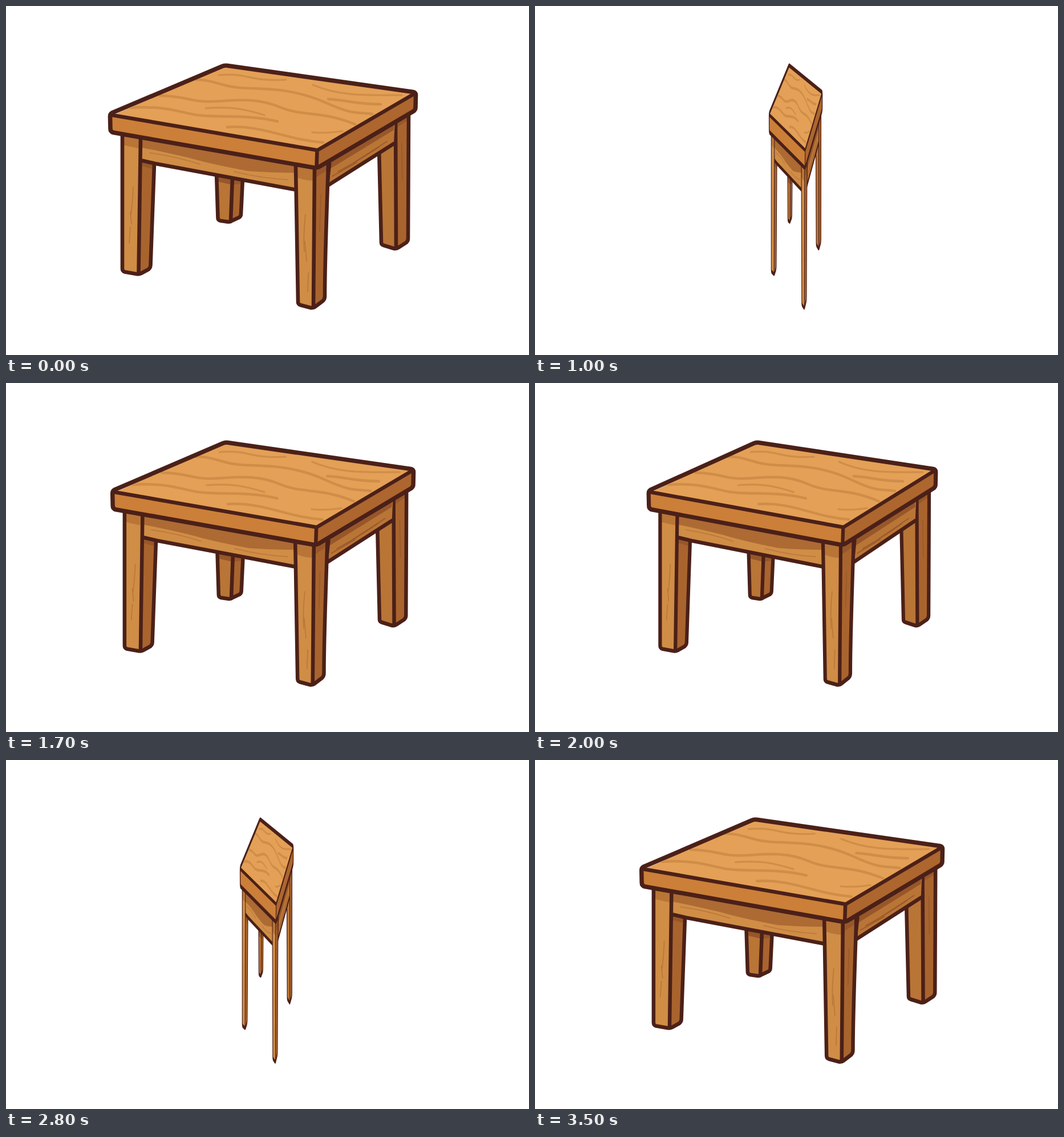
These frames come from a looping animation (917x611 px, 3600 ms). An HTML page:

```html
<!DOCTYPE html>
<html lang="en">
<head>
<meta charset="utf-8">
<title>Turning table</title>
<style>
  @property --turn { syntax: "<angle>"; inherits: false; initial-value: 0deg; }
  html, body { margin: 0; width: 100%; height: 100%; overflow: hidden; background: #fff; }
  svg { display: block; width: 100%; height: 100%; }

  /* Half turns in 10 degree steps; the table narrows with the cosine and never mirrors. */
  #table {
    transform-origin: 458.5px 0;
    transform: scaleX(max(1 / 917, cos(var(--turn))));
    animation: turn 1800ms steps(18) -900ms infinite;
  }
  @keyframes turn {
    from { --turn: -90deg; }
    to { --turn: 90deg; }
  }

  .line { fill: none; stroke: #4b2018; stroke-width: 6.6; stroke-linejoin: round; stroke-linecap: round; }
  .rim { stroke-width: 7.6; }
  .top { fill: #e3a056; }
  .edge { fill: #cb7f38; }
  .edge-side { fill: #ad662e; }
  .front { fill: #cf8d46; }
  .side { fill: #a9642e; }
  .dim { fill: #b97536; }
  .shade { fill: #ad6a33; }
  .deep { fill: #985729; }
  .grain { fill: none; stroke: #cf8d48; stroke-width: 4.5; stroke-linecap: round; }
  .thin { stroke-width: 3.2; }
  .fine { fill: none; stroke: #b97639; stroke-width: 1.6; stroke-linecap: round; }
  .dark { fill: none; stroke: #9a592a; stroke-width: 1.6; stroke-linecap: round; }
</style>
</head>
<body>
<svg viewBox="0 0 917 611">
  <defs>
    <clipPath id="face"><path d="M188 192 385 104 718 153 546 253Z"/></clipPath>
  </defs>
  <g id="table">

    <!-- back leg -->
    <path class="dim" d="M369 290 372 375 393 378 397 295Z"/>
    <path class="side" d="M397 295 393 378 412 367 415 300Z"/>
    <path class="deep" d="M369 290 370 307 396 313 414 311 415 300Z"/>
    <path class="line" d="M369 292 371.500 371Q371.500 375 376 376L390 378Q393 378 396 376L409 370Q412 368 412 364L415 302M397 300 394 377"/>

    <!-- right leg -->
    <path class="dim" d="M654 220 658 418 684 425 682 200Z"/>
    <path class="side" d="M682 200 684 425 705 410 706 188Z"/>
    <path class="deep" d="M682 198 706 186V199L683 214Z"/>
    <path class="line" d="M654 248 658 414Q658 418 662 419L680 424.500Q684 425.500 688 423L702 414Q705 411 705 407L706 188M683 204 684 424"/>
    <path class="dark" d="M694 240 695 305"/>

    <!-- side apron -->
    <path class="dim" d="M563 268 682 200 680 241 563 315Z"/>
    <path class="deep" d="M565 272 680 205V217L565 287Z"/>
    <path class="dark" d="M582 290Q620 270 655 246M572 298 615 274M610 274 668 237"/>
    <path class="line" d="M567 276 563 315 680 241"/>

    <!-- front left leg -->
    <path class="front" d="M204 222 204 464 233 469 236 228Z"/>
    <path class="side" d="M237 260 233 469 254 457 260 270Z"/>
    <path class="dim" d="M204 222 236 228V250L204 243Z"/>
    <path class="deep" d="M238 270 260 275V286L237 280Z"/>
    <path class="fine" d="M223 317Q222 345 219 366M218 360 220 382M218 387 216 415"/>
    <path class="line" d="M204 226 204 460Q204 464 208 465.500L228 469Q233 470 237 468L250 461Q253.500 458 253.500 454L260 276"/>

    <!-- front apron -->
    <path class="front" d="M237 230 508 280 508 321 238 269Z"/>
    <path class="shade" d="M237 234 508 280V292Q465 292 425 289 360 277 322 266 280 256 238 248Z"/>
    <path class="fine" d="M252 257Q300 264 340 277M400 290Q450 302 494 304"/>
    <path class="line" d="M238 270.500 262 276 507 321.500M236 232 232.500 467"/>

    <!-- front leg -->
    <path class="front" d="M508 280 512 522 538 528 541 284Z"/>
    <path class="side" d="M541 284 538 528 559 511 566 276Z"/>
    <path class="dim" d="M508 280 541 286V306Q522 306 508 299Z"/>
    <path class="deep" d="M543 287 565 276V286L542 301Z"/>
    <path class="fine" d="M525 365Q521 400 523 430M524 412 527 447M530 467 529 500"/>
    <path class="dark" d="M552 330 550 395"/>
    <path class="line" d="M508 282 512 518Q512 522 516 523.500L533 528Q538 529.500 542 526.500L556 516Q559 513 559 508C559 440 563 350 565 276M541 286 539 526"/>

    <!-- top -->
    <path class="edge" d="M184 189 546 253 545 283 187 221Q183 220 183 216Z"/>
    <path class="edge-side" d="M546 253 718 153V180L545 283Z"/>
    <path class="top" d="M188 191 385 104 718 153 546 253Z"/>
    <g class="grain" clip-path="url(#face)">
      <path d="M325 129C365 127 375 143 425 144S515 149 560 169 610 186 642 189"/>
      <path d="M270 157C320 158 325 169 365 167S440 160 480 177 550 182 612 207"/>
      <path d="M218 178C275 175 295 183 330 190S420 188 476 202"/>
      <path d="M388 212C450 208 490 234 556 239"/>
      <path class="thin" d="M538 138C580 156 620 157 694 156"/>
      <path d="M565 163C595 164 610 172 657 172"/>
      <path class="thin" d="M373 121C425 116 425 133 491 129"/>
      <path class="thin" d="M350 179C395 175 420 181 453 191"/>
      <path class="thin" d="M537 221C555 223 570 222 590 219"/>
    </g>
    <path class="line" d="M186 191 546 252.500 717 153M545.500 253 544.500 282"/>
    <path class="line rim" d="M186 187 379 105.500Q383 104 387 104.300L714 150.500Q718.500 151.500 718.500 156L718 178Q718 182 714 184.500L550 281Q545 284 540 283L188 221.500Q183 220 183 215L182.500 193Q182.500 189 186 187Z"/>
  </g>
</svg>
</body>
</html>
```
